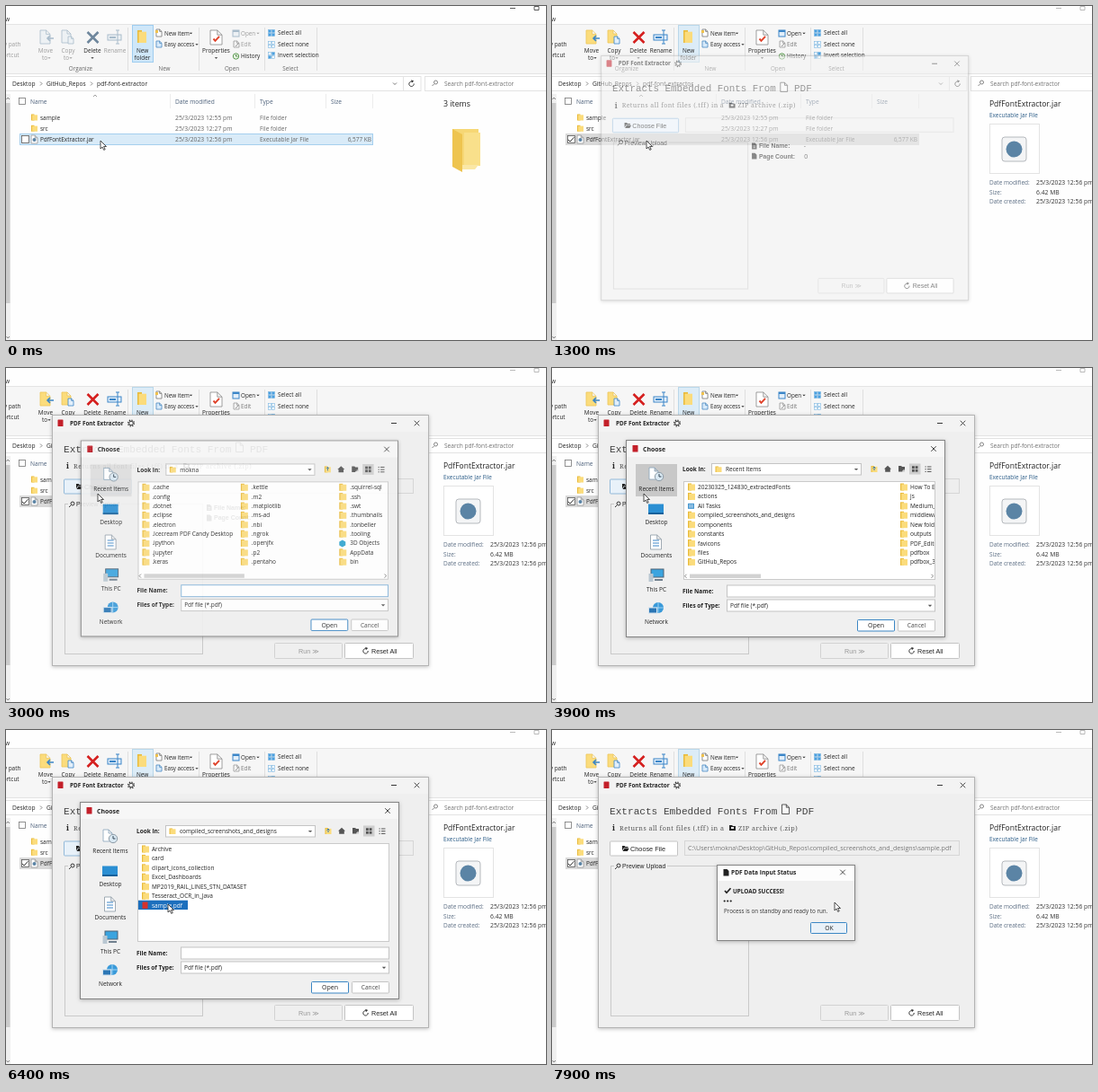
An HTML page for the animation above (8000 ms loop, 600 by 372 pixels).

```html
<!DOCTYPE html>
<html lang="en">
<head>
<meta charset="utf-8">
<title>Font extractor demo</title>
<style>
html, body { margin: 0; width: 100%; height: 100%; overflow: hidden; background: #fff; }
svg { display: block; width: 600px; height: 372px; font-family: "Open Sans", "Noto Sans", sans-serif; }
text { white-space: pre; }
.sans { font-family: "Liberation Sans", Arial, sans-serif; }
.mono { font-family: "Liberation Mono", monospace; }
.serif { font-family: "Noto Serif", serif; letter-spacing: .45px; }
.b { font-weight: 700; }
.mid { text-anchor: middle; }
.end { text-anchor: end; }
.win { filter: drop-shadow(0 1px 2px rgba(0, 0, 0, .25)); }
</style>
</head>
<body>
<svg id="stage" viewBox="0 0 600 372"></svg>
<script>
const INK = '#222', DIM = '#9b9b9b';

const text = (x, y, s, size = 6.5, fill = INK, cls = '') =>
  `<text x="${x}" y="${y}" font-size="${size}" fill="${fill}" class="${cls}">${s}</text>`;
const box = (x, y, w, h, fill, stroke = 'none', more = '') =>
  `<rect x="${x}" y="${y}" width="${w}" height="${h}" fill="${fill}" stroke="${stroke}" ${more}/>`;
const line = (d, stroke = INK, width = 1, fill = 'none') =>
  `<path d="${d}" stroke="${stroke}" stroke-width="${width}" fill="${fill}"/>`;
const shape = (d, fill = INK) => `<path d="${d}" fill="${fill}"/>`;
const dot = (x, y, r, fill, stroke = 'none') =>
  `<circle cx="${x}" cy="${y}" r="${r}" fill="${fill}" stroke="${stroke}"/>`;
const group = (id, body, more = '') => `<g id="${id}" ${more}>${body}</g>`;

const down = (x, y, c = INK, r = 1.7) => shape(`M${x - r} ${y - r / 2}h${2 * r}l${-r} ${r}z`, c);
const cross = (x, y, r = 2.8, c = INK, w = .8) =>
  line(`M${x - r} ${y - r}l${2 * r} ${2 * r}M${x + r} ${y - r}l${-2 * r} ${2 * r}`, c, w);
const chevron = (x, y) => line(`M${x - 1} ${y - 2}l2 2l-2 2`, '#555', .7);
const tick = (x, y, c, w = 1.2) => line(`M${x - 3} ${y}l2 2.3l4.5 -5`, c, w);
const lens = (x, y, c = '#555') =>
  line(`M${x - 3} ${y + 3}l2.2 -2.2M${x - 1} ${y - 1}a2 2 0 1 0 4 0a2 2 0 1 0 -4 0`, c, .9);
const page = (x, y, w, h, fill, stroke) =>
  line(`M${x} ${y}h${w * .6}l${w * .4} ${w * .4}v${h - w * .4}h${-w}zM${x + w * .6} ${y}v${w * .4}h${w * .4}`, stroke, .8, fill);
const folder = (x, y, w = 7, h = 7) =>
  box(x, y, w * .5, h, '#e9bb3c') + box(x + w * .15, y + h * .12, w * .85, h * .88, '#fbdc7c');
const bookmark = (x, y) => box(x, y, 6, 7.5, '#c3202a', 'none', 'rx=".6"');
const reload = (x, y, r = 2.7) =>
  line(`M${x + r} ${y}a${r} ${r} 0 1 1 ${-r * .6} ${-r * .8}`, '#333', 1) +
  shape(`M${x - .3} ${y - r - 1.5}l3 1.2l-2.2 2z`, '#333');
const button = (x, y, w, h, fill = '#fff', stroke = '#c4c4c4') =>
  box(x + .5, y + .5, w, h, fill, stroke, 'rx="1"');

function ribbon(on) {
  const c = on ? INK : DIM, blue = on ? '#3c86c8' : '#a9bccb', paper = on ? '#e3effa' : '#edf1f4';
  const gold = on ? '#fbdc7c' : paper, goldEdge = on ? '#ecc65a' : blue;
  const mid = (x, y, s, fill = INK) => text(x, y, s, 6.4, fill, 'mid');
  return text(-6, 45, 'py path', 6.4, c) + text(-12, 57, ' shortcut', 6.4, c) +
    page(38, 27, 11, 15, gold, goldEdge) + line('M53 36h-7m3 -3l-3 3l3 3', blue, 1.6) +
    mid(44, 52, 'Move', c) + mid(43, 60, 'to', c) + down(48, 58, c) +
    page(62, 27, 10, 14, gold, goldEdge) + page(69, 34, 6, 8, paper, blue) +
    mid(69, 52, 'Copy', c) + mid(67, 60, 'to', c) + down(72, 58, c) +
    cross(96.5, 35, 6, on ? '#d5201f' : '#6f879d', 2.6) + mid(96, 52, 'Delete') + down(96, 58) +
    box(113, 32, 15, 6, paper, blue) + box(115, 34, 7, 2, blue) + line('M124 27v15m-2 -15h4m-4 15h4', blue) +
    mid(121, 52, 'Rename', c) +
    box(140.5, 21.5, 23, 41, on ? '#dcecf7' : '#cfe7f9', on ? '#b9d7ea' : '#9fcdf0') + folder(146, 27, 10, 14) +
    mid(151.5, 52, 'New') + mid(151.5, 60, 'folder') +
    page(167, 26, 6, 8, '#fff', '#777') + shape('M166 27h3v3h-3z', '#efc14d') +
    text(176, 32.5, 'New item', 6.3) + down(205.5, 30.5) +
    page(167, 39, 6, 7, '#d7eafa', '#4a8ac2') + text(176, 45, 'Easy access', 6.2) + down(212, 43) +
    page(227, 27, 13, 16, '#fff', '#8a8a8a') + tick(233.5, 36.5, '#e0452d', 2) +
    mid(233.5, 52, 'Properties') + down(233.5, 58) +
    box(252, 27, 7, 7, paper, blue) + box(252, 27, 7, 2, blue) + text(261, 32.5, 'Open', 6.3, c) + down(280, 30.5, c) +
    page(253, 39, 6, 7, '#f4f4f4', DIM) + line('M255 45l4 -4', DIM) + text(261, 45, 'Edit', 6.4, on ? '#777' : DIM) +
    dot(255.5, 56, 3.2, '#e9f4e4', '#5b9b52') + line('M255.5 54v2h2', '#3d7635', .8) + text(261, 58.3, 'History', 6.4) +
    [30, 43, 55].map((y, i) => [0, 1, 2, 3].map(k =>
      box(291.5 + k % 2 * 4, y - 3.5 + (k >> 1) * 4, 3, 3, i == 0 || i == 2 && k % 3 ? '#4aa0e0' : '#fff', '#7bb6e2', 'stroke-width=".6"')).join('') +
      text(302, y + 2.4, ['Select all', 'Select none', 'Invert selection'][i], 6.4)).join('');
}

function explorer() {
  const groups = [[83, 'Organize'], [176, 'New'], [251, 'Open'], [316, 'Select']];
  const rows = [[126.5, 'sample', '25/3/2023 12:55 pm'], [138.8, 'src', '25/3/2023 12:27 pm']];
  return box(0, 0, 600, 372, '#fefefe') +
    text(-10, 17, 'View', 6.5) +
    box(0, 20, 600, 55, '#f6f6f6') + line('M0 20.5H600M0 75.5H600', '#e4e4e4') +
    line('M135.5 24V72M214.5 24V72M287.5 24V72M345.5 24V72', '#dfdfdf') +
    groups.map(([x, s]) => text(x, 71.5, s, 6.3, '#666', 'mid')).join('') +
    group('ribbonOff', ribbon(false)) + group('ribbonOn', ribbon(true)) +
    group('caption', line('M560 2.5h6M587 .5h5v4h-5z', 'currentColor', .8)) +
    box(-1, 78.5, 462, 16, '#fff', '#e3e3e3') + box(465.5, 78.5, 140, 16, '#fff', '#e3e3e3') +
    text(7, 88.7, 'Desktop', 6.6) + chevron(39, 86.5) + text(45, 88.7, 'GitHub_Repos', 6.6) + chevron(95, 86.5) +
    text(101, 88.7, 'pdf-font-extractor', 6.75) +
    line('M430 85.5l2 2l2 -2', '#555', .8) + line('M441.5 79v15', '#e3e3e3') + reload(450.5, 86.5) +
    lens(476.5, 86, '#777') + text(487, 88.7, 'Search pdf-font-extractor', 6.6, '#707070') +
    box(0, 98, 5, 274, '#f0f0f0') + box(0, 108, 4.5, 223, '#cbcbcb') +
    line('M.5 104l1.7 -2l1.7 2M.5 368l1.7 2l1.7 -2', '#666', .8) +
    box(14.5, 102.5, 7, 7, '#fff', '#777', 'stroke-width=".8"') + line('M97 101l2 -2l2 2', '#777', .7) +
    [[27, 'Name'], [188, 'Date modified'], [282, 'Type'], [361, 'Size']].map(([x, s]) => text(x, 108.6, s, 6.6, '#4c607a')).join('') +
    line('M182.5 98v16M276.5 98v16M355.5 98v16M407.5 98v16', '#ececec') +
    rows.map(([y, name, date]) => folder(28, y - 6) + text(38, y, name) + text(188, y, date, 6.8, '#666') + text(282, y, 'File folder', 6.5, '#666')).join('') +
    `<rect id="jarRow" x="15.5" y="142.5" width="392" height="12"/>` +
    box(17.5, 144.5, 8, 8, '#fff', '#555', 'stroke-width=".8"') + group('jarTick', tick(21, 148.8, '#222', .9)) +
    page(28, 144, 7, 9, '#fff', '#999') + dot(31.5, 149, 2, '#5b84a5') +
    text(38, 151.2, 'PdfFontExtractor.jar', 6.4) + text(188, 151.2, '25/3/2023 12:56 pm', 6.8, '#666') +
    text(282, 151.2, 'Executable Jar File', 6.5, '#666') + text(406, 151.2, '6,577 KB', 6.5, '#666', 'end') +
    group('paneItems', text(486, 111.5, '3 items', 8.8) +
      shape('M496 137h29v41h-29z', '#f6d775') + shape('M509 141h18v37h-18z', '#f9e08b') +
      shape('M496 137l11 6v42l-11 -6z', '#eec44f') + shape('M507 177h18l-4 5h-14z', '#fae7a5')) +
    group('paneJar', text(486, 111.5, 'PdfFontExtractor.jar', 8.5) + text(486, 123.6, 'Executable Jar File', 6.45, '#285a86') +
      box(486.5, 131.5, 55, 55, '#fff', '#e3e3e3') + box(500, 146, 27, 27, '#f4f5f6', '#b5b9bd', 'rx="3"') + dot(513.5, 159.5, 9, '#5b84a5') +
      [['Date modified:', '25/3/2023 12:56 pm'], ['Size:', '6.42 MB'], ['Date created:', '25/3/2023 12:56 pm']]
        .map(([k, v], i) => text(486, 199.3 + i * 10.2, k, 6.5, '#5a6c82') + text(538, 199.3 + i * 10.2, v, 6.8, '#333')).join(''));
}

function appWindow() {
  const gear = dot(139, 61.5, 2.3, 'none', '#333') +
    `<circle cx="139" cy="61.5" r="3.4" fill="none" stroke="#333" stroke-width="1.3" stroke-dasharray="1.3 1.37"/>`;
  return box(51.5, 52.5, 418, 279, '#efefef', '#b4b4b4', 'class="win"') + box(52, 53, 417, 18, '#f3f3f3') +
    bookmark(57.5, 57.5) + text(71, 63.8, 'PDF Font Extractor', 6.4, INK, 'b') + gear +
    line('M428 61.5h6', INK, .9) + cross(456.5, 61.5) +
    text(64, 93.5, 'Extracts Embedded Fonts From', 11.1, '#444', 'mono') + page(255.5, 83, 8, 10.5, '#f7f7f7', '#333') +
    text(271, 93.5, 'PDF', 11.3, '#444', 'mono') +
    text(67, 112, 'i', 8.5, INK, 'serif b') + text(75, 111.5, 'Returns all font files (.tff) in a', 7.2, '#555', 'serif') +
    shape('M197 106h3l1 1h3v5h-7z') + box(199, 108, 3, 2, '#efefef') + text(207, 111.5, 'ZIP archive (.zip)', 7.2, '#555', 'serif') +
    `<rect id="choose" x="64.5" y="124" width="75" height="16" rx="1"/>` +
    shape('M78 129h2.5l1 1h3v1.2h-4.5l-2 3z') + shape('M80.5 131.8h5.2l-1.8 3.2h-5.4z') +
    text(87, 134.8, 'Choose File', 7.3, INK, 'sans') + box(147.5, 123.5, 305, 16, '#eeeeee', '#d6d6d6') +
    group('path', text(151, 134.4, 'C:\\Users\\mokna\\Desktop\\GitHub_Repos\\compiled_screenshots_and_designs\\sample.pdf', 7.1, '#777')) +
    box(65.5, 151.5, 153, 167, 'none', '#c9c9c9') + box(69, 148, 59, 7, '#efefef') + lens(73, 152, INK) +
    text(78, 154.2, 'Preview Upload', 6.9, INK, 'sans') +
    shape('M223 152h3.5l2 2v5h-5.5z') + line('M224.5 155.5h2.5m-2.5 1.7h2.5', '#fff', .6) + text(231, 158, 'File Name:', 7, INK, 'sans b') + text(282, 158, '-', 7, INK, 'sans') +
    shape('M223 163.5h3.5l2 2v5h-5.5z') + text(231, 169.4, 'Page Count:', 7, INK, 'sans b') + text(282.5, 169.4, '0', 7.2, INK, 'sans') +
    button(298, 306, 75, 17, '#efefef', '#d2d2d2') + text(325, 317.7, 'Run ≫', 7.2, '#999', 'sans') +
    button(376, 306, 76, 17) + reload(399.5, 315) + text(406, 317.7, 'Reset All', 7.2, INK, 'sans');
}

const ROW = 10.42, rowY = i => 135 + i * ROW;
const fileIcon = (x, y, name) =>
  name == 'sample.pdf' ? box(x + .5, y - 6, 6, 7.5, '#d5322d') :
  name == '3D Objects' ? shape(`M${x} ${y - 4}l3.5 -2l3.5 2v4l-3.5 2l-3.5 -2z`, '#2fa4cf') :
  name == 'All Tasks' ? box(x, y - 5, 7, 6, '#4797d0') + line(`M${x + 1} ${y - 3}h5m-5 2h5`, '#fff', .7) :
  folder(x, y - 6.5, 8, 8);
const column = (x, textX, names) =>
  names.split('|').map((s, i) => fileIcon(x, rowY(i), s) + text(textX, rowY(i), s)).join('');
const picked = (row, w, name) =>
  box(147, rowY(row) - 7.8, w, 10.4, '#1c6fbd') + fileIcon(151, rowY(row), name) + text(162, rowY(row), name, 6.5, '#fff');
const thumb = w => line('M149.5 229.8l-2 2l2 2M421.5 229.8l2 2l-2 2', '#666', .8) + box(153, 229.5, w, 4.5, '#d2d2d2');
const lookIn = s => folder(181.5, 109.5, 7, 6.5) + text(193, 115.2, s);

function chooser() {
  const places = [['Recent Items', 137], ['Desktop', 174], ['Documents', 211], ['This PC', 248.5], ['Network', 285.3]];
  const icons = [
    page(108, 111, 10, 13, '#fff', '#8aa4ba') + dot(119, 121, 4.7, '#d9e8f2', '#8c9aa5') + line('M119 118v3h2.5', '#345'),
    box(107, 151.5, 17, 11, '#2b8fd3') + box(107, 161, 17, 2, '#17619b'),
    page(109.5, 186, 12, 16, '#fff', '#8997a3') + line('M112 192h7m-7 3h7m-7 3h7', '#3c86c8'),
    box(110, 224, 14, 9, '#3ba4df', '#4f6274') + box(107.5, 229, 5, 9, '#b9c7d1') + box(114, 235, 9, 2, '#6f7f8d'),
    dot(118, 267, 6, '#3a9ad9') + line('M112 267h12M118 261v12', '#b5e0fa', .8) + box(107.5, 267, 9, 6, '#2b76b5', '#d2e2ee')];
  const field = (y, id = '') => box(194.5, y, 231, 13, '#fff', '#c4c4c4', id);
  return box(82.5, 80.5, 354, 219, '#f0f0f0', '#858585', 'class="win"') + box(83, 81, 353, 18, '#f7f7f7') +
    bookmark(89.5, 86) + text(101, 92.7, 'Choose', 6.9, INK, 'b') + cross(424, 90) +
    `<rect id="recent" x="93" y="107" width="46" height="36"/>` +
    places.map(([s, y], i) => icons[i] + text(116, y, s, 6.5, INK, 'mid')).join('') +
    text(145, 115.2, 'Look In:', 6.5, INK, 'b') + box(177.5, 106.5, 166, 12.5, '#fff', '#c4c4c4') + down(338, 113, '#555', 2.2) +
    folder(354.5, 109, 7, 7) + line('M358 114v-4m-1.5 1.5l1.5 -1.5l1.5 1.5', '#3474a7') +
    shape('M369 112.5l4 -3.8l4 3.8h-1.2v3.3h-5.6v-3.3z', '#555') +
    shape('M385 109h3l1 1h3v5.5h-7z', '#555') + line('M391 113v4m-2 -2h4', '#f0f0f0') +
    box(397, 106.5, 12.5, 12, '#cecece') +
    [0, 1, 2, 3].map(k => box(400 + k % 2 * 3.7, 109.2 + (k >> 1) * 3.7, 2.8, 2.8, '#555')).join('') +
    line('M414.5 110h1.3m1.2 0h4.5m-7 2.7h1.3m1.2 0h4.5m-7 2.7h1.3m1.2 0h4.5', '#555') +
    box(146.5, 126.5, 279, 109, '#fff', '#cacaca') +
    group('home', lookIn('mokna') +
      column(151, 162, '.cache|.config|.dotnet|.eclipse|.electron|.Icecream PDF Candy Desktop|.ipython|.jupyter|.keras') +
      column(261, 273, '.kettle|.m2|.matplotlib|.ms-ad|.nbi|.ngrok|.openjfx|.p2|.pentaho') +
      column(371, 383, '.squirrel-sql|.ssh|.swt|.thumbnails|.tonbeller|.tooling|3D Objects|AppData|bin') + thumb(112)) +
    group('recentList', lookIn('Recent Items') +
      column(151, 162, '20230325_124830_extractedFonts|actions|All Tasks|compiled_screenshots_and_designs|components|constants|favicons|files|GitHub_Repos') +
      `<g clip-path="url(#listClip)">` + column(387, 398, 'How To Export|js|Medium_Posts|middleware|New folder|outputs|PDF_Editor|pdfbox|pdfbox_3.0') + '</g>' +
      thumb(79) + group('pickFolder', picked(3, 129, 'compiled_screenshots_and_designs'))) +
    group('designs', lookIn('compiled_screenshots_and_designs') +
      column(151, 162, 'Archive|card|clipart_icons_collection|Excel_Dashboards|MP2019_RAIL_LINES_STN_DATASET|Tesseract_OCR_in_Java|sample.pdf') +
      group('pickFile', picked(6, 55, 'sample.pdf'))) +
    text(145, 250.8, 'File Name:', 6.5, INK, 'b') + field(242, 'id="nameField"') +
    text(145, 266.8, 'Files of Type:', 6.5, INK, 'b') + field(258) + text(198, 266.8, 'Pdf file (*.pdf)') + down(420, 264.8, '#555', 2.2) +
    button(339, 280, 41, 12.5, '#fff', '#3b86c4') + text(360, 289.3, 'Open', 7, INK, 'mid') +
    button(384, 280, 41, 12.5) + text(405, 289.3, 'Cancel', 6.6, '#444', 'mid');
}

function statusDialog() {
  return box(183.5, 150.5, 153, 84, '#f0f0f0', '#858585', 'class="win"') + box(184, 151, 152, 17, '#fdfdfd') +
    shape('M190.5 155h4l2 2v5.5h-6z') + text(199, 161.3, 'PDF Data Input Status', 6.6, INK, 'b') + cross(323, 158.5) +
    tick(195, 179, INK, 1.7) + text(201, 181.8, 'UPLOAD SUCCESS!', 6.4, INK, 'b') +
    [191.7, 195.2, 198.7].map(x => dot(x, 190.5, 1.1, INK)).join('') +
    text(191, 203.7, 'Process is on standby and ready to run.', 6.3, '#333') +
    button(287, 214, 40, 12, '#e9f1f8', '#3b86c4') + text(308, 222.8, 'OK', 6.8, INK, 'mid');
}

const stage = document.getElementById('stage');
stage.innerHTML = '<clipPath id="listClip"><rect x="147" y="127" width="278" height="108"/></clipPath>' +
  explorer() + group('app', appWindow()) + group('dialog', chooser()) + group('status', statusDialog()) +
  group('cursor',
    group('arrow', line('M0 0v9l2.1 -1.9l1.6 3.3l1.5 -.7l-1.6 -3.2h2.9z', '#222', .8, '#fff')) +
    group('hand', line('M-.8 5v-4.2q.8 -1.2 1.6 0v3q2 -.3 4 .8q.7 .6 .4 2.8l-1 3.6h-4l-3.2 -4.2q.7 -1.4 2.2 .2z', '#222', .8, '#fff')));

const el = Object.fromEntries([...stage.querySelectorAll('[id]')].map(e => [e.id, e]));
const show = (id, on) => el[id].style.display = on ? '' : 'none';
const clamp = p => Math.max(0, Math.min(1, p));
const smooth = p => p * p * (3 - 2 * p);

// Windows open and close with a fade and a slight zoom about (cx, cy).
function fade(id, t, start, end, cx, cy) {
  const p = clamp((t - start) / 250), q = clamp((t - end) / 200);
  const o = (1 - (1 - p) ** 2) * (1 - q), k = 1 - .052 * (1 - o);
  show(id, o > 0);
  el[id].setAttribute('opacity', o);
  el[id].setAttribute('transform', `translate(${cx * (1 - k)} ${cy * (1 - k)}) scale(${k})`);
}

const stops = [[0, 105, 150], [1400, 105, 150], [1800, 102, 140], [4000, 102, 140], [4700, 180, 167],
  [5600, 180, 167], [6100, 180, 194], [7000, 180, 194], [7700, 314, 192], [8000, 314, 192]];
function cursorAt(t) {
  const i = stops.findIndex(s => s[0] > t), a = stops[i - 1], b = stops[i];
  const p = smooth((t - a[0]) / (b[0] - a[0]));
  return [a[1] + (b[1] - a[1]) * p, a[2] + (b[2] - a[2]) * p];
}

function draw(t) {
  const selected = t >= 400, inactive = t >= 1200, hover = t >= 1700 && t < 2900, focused = t < 7000;
  show('ribbonOff', !selected); show('ribbonOn', selected);
  show('paneItems', t < 500); show('paneJar', t >= 500); show('jarTick', selected);
  el.jarRow.setAttribute('fill', inactive ? '#d9d9d9' : selected ? '#cce8ff' : '#d9ebf8');
  el.jarRow.setAttribute('stroke', inactive ? '#d9d9d9' : '#a5cfee');
  el.caption.style.color = inactive ? '#aaa' : '#333';

  fade('app', t, 1220, 9000, 185, 175);
  fade('dialog', t, 2830, 6800, 240, 190);
  fade('status', t, 7150, 9000, 260, 192);
  el.choose.setAttribute('fill', focused ? '#e8f1f9' : '#fff');
  el.choose.setAttribute('stroke', focused ? '#93b9d9' : '#c4c4c4');
  show('path', t >= 7100);

  show('home', t < 3600); show('recentList', t >= 3600 && t < 5300); show('designs', t >= 5300);
  show('pickFolder', t >= 4800); show('pickFile', t >= 6300);
  el.recent.setAttribute('fill', t < 3500 ? '#dedede' : t < 5300 ? '#c8c8c8' : 'none');
  el.nameField.setAttribute('stroke', t < 3500 ? '#86b5da' : '#c4c4c4');

  const [x, y] = cursorAt(t);
  el.cursor.setAttribute('transform', `translate(${x} ${y})`);
  show('hand', hover); show('arrow', !hover);
}

const begin = performance.now();
function tickFrame() {
  draw(Math.floor((performance.now() - begin) % 8000 / 100) * 100);
  requestAnimationFrame(tickFrame);
}
tickFrame();
</script>
</body>
</html>
```
